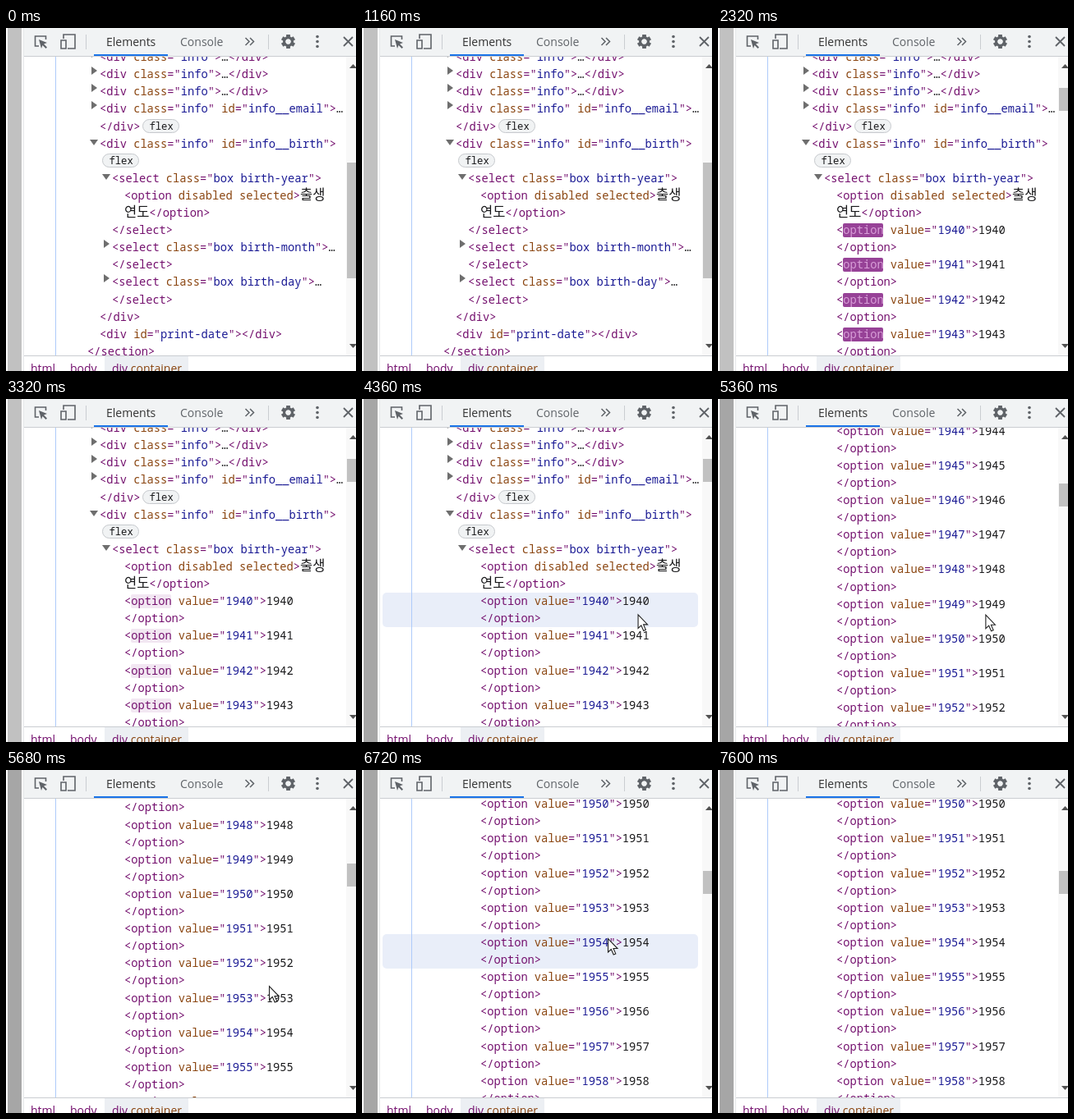
An HTML page with a canvas for the animation above (8560 ms loop, 426 by 418 pixels).

```html
<!DOCTYPE html>
<html lang="en">
<head>
<meta charset="utf-8">
<title>Elements panel</title>
<style>
  html, body { margin: 0; width: 100%; height: 100%; overflow: hidden; background: #fff; }
  canvas { display: block; }
</style>
</head>
<body>
<canvas id="stage" width="426" height="418"></canvas>
<script>
const ctx = document.getElementById('stage').getContext('2d');
const LOOP = 8560, ROW = 21.1, FIRST = 56.8, OPTION_ROW = 9;
const INSERT = 2160, PAGE_DIM = 4040;
const MONO = '13.73px "Noto Sans Mono", monospace';
const HANGUL = '300 16.5px "Noto Sans CJK KR", "Noto Sans CJK", sans-serif';
const UI = '14px "Open Sans", sans-serif';
const TAG = '#74106e', ATTR = '#8a4510', VALUE = '#1a1a94', TEXT = '#18181a';

// Each row: indent, markup, then an arrow or a badge.
const head = [
  [114, '<div class="info">…</div>', 'closed'],
  [114, '<div class="info">…</div>', 'closed'],
  [114, '<div class="info">…</div>', 'closed'],
  [114, '<div class="info" id="info__email">…', 'closed'],
  [114, '</div>', 'badge'],
  [114, '<div class="info" id="info__birth">', 'open'],
  [114, '', 'badge'],
  [129, '<select class="box birth-year">', 'open'],
  [144, '<option disabled selected>출생'],
  [144, '연도</option>']
];
const tail = [
  [129, '</select>'],
  [129, '<select class="box birth-month">…', 'closed'],
  [129, '</select>'],
  [129, '<select class="box birth-day">…', 'closed'],
  [129, '</select>'],
  [114, '</div>'],
  [114, '<div id="print-date"></div>'],
  [99, '</section>']
];
const options = [];
for (let year = 1940; year <= 2021; year++)
  options.push([144, `<option value="${year}">${year}`, 'new'], [144, '</option>']);
const before = [...head, ...tail], after = [...head, ...options, ...tail];

const wheel = [4774, 4990, 5190, 5400, 5648];
const pointerPath = [
  [4000, 2, 320], [4380, 338, 262], [4800, 338, 262], [5680, 320, 263],
  [6300, 299, 205], [6760, 299, 205], [7060, 400, -22]
];

const clamp = u => Math.max(0, Math.min(1, u));
const smooth = u => (u = clamp(u), u * u * (3 - 2 * u));
const mix = (a, b, u) => `rgb(${a.map((v, i) => Math.round(v + (b[i] - v) * u))})`;
const scrollAt = t => wheel.reduce((sum, start) => sum + 125.4 * smooth((t - start) / 150), 0);

function rect(x, y, w, h, color) {
  ctx.fillStyle = color;
  ctx.fillRect(x, y, w, h);
}
function round(x, y, w, h, r, fill, stroke) {
  ctx.beginPath();
  ctx.roundRect(x, y, w, h, r);
  ctx.fillStyle = fill;
  ctx.fill();
  if (stroke) { ctx.lineWidth = 1; ctx.strokeStyle = stroke; ctx.stroke(); }
}
function poly(points, fill) {
  ctx.beginPath();
  for (let i = 0; i < points.length; i += 2) ctx.lineTo(points[i], points[i + 1]);
  ctx.closePath();
  ctx.fillStyle = fill;
  ctx.fill();
}
function line(path, color, width) {
  ctx.strokeStyle = color;
  ctx.lineWidth = width;
  ctx.stroke(new Path2D(path));
}
function write(text, x, y, color, font) {
  ctx.font = font;
  ctx.fillStyle = color;
  ctx.fillText(text, x, y);
  return x + ctx.measureText(text).width;
}

function markup(x, y, source, tagColor) {
  const put = (text, color, font = MONO) => { x = write(text, x, y, color, font); };
  for (const [, tag, attr, value, text] of
       source.matchAll(/(<\/?\w+|>)|( [\w-]+)(?:="([^"]*)")?|([^<>]+)/g)) {
    if (tag) {
      const [mark] = tag.match(/^(<\/?|>)/);
      put(mark, TAG);
      put(tag.slice(mark.length), tagColor);
    } else if (attr) {
      put(attr, ATTR);
      if (value) { put('="', TAG); put(value, VALUE); put('"', TAG); }
    } else {
      put(text, TEXT, /[가-힣]/.test(text) ? HANGUL : MONO);
    }
  }
  return x;
}

function flash(t) {
  const age = t - INSERT, pale = [241, 229, 241];
  if (age >= 1400) return { box: null, text: TAG };
  const u = smooth(age / 1120);
  return {
    box: age < 1120 ? mix([146, 56, 146], pale, u)
                    : mix(pale, [255, 255, 255], smooth((age - 1120) / 280)),
    text: mix([222, 166, 222], [116, 16, 110], u)
  };
}

function pointerAt(t) {
  const i = pointerPath.findIndex(p => p[0] > t);
  if (i < 1) return null;
  const [t0, x0, y0] = pointerPath[i - 1], [t1, x1, y1] = pointerPath[i];
  const u = smooth((t - t0) / (t1 - t0));
  return { x: x0 + (x1 - x0) * u, y: y0 + (y1 - y0) * u };
}

function drawHover(t, scroll, pointer) {
  const scrolling = t > 4870 && t < 5990;
  if (!pointer || scrolling || pointer.x < 22 || pointer.y < 35) return;
  const settled = t < 5000 ? 0 : scroll;
  let row = Math.floor((pointer.y + settled - FIRST + 10.5) / ROW);
  row -= (row - OPTION_ROW) % 2;
  round(25, Math.round(FIRST + row * ROW - 11 - scroll), 384, 42, 5, '#e9eef9');
}

function drawTree(t, scroll, pointer) {
  ctx.save();
  ctx.beginPath();
  ctx.rect(22, 35, 404, 364);
  ctx.clip();
  drawHover(t, scroll, pointer);
  rect(60, 35, 1, 364, '#aecbfa');
  const glow = flash(t);
  (t < INSERT ? before : after).forEach(([x, source, kind], i) => {
    const y = FIRST + (i - 1) * ROW - scroll;
    if (y < 15 || y > 420) return;
    const base = Math.round(y + 4.4), left = x - 7;
    if (kind === 'closed')
      poly([left - 3, base - 14, left + 4, base - 9, left - 3, base - 4], '#6e6e6e');
    if (kind === 'open')
      poly([left - 5, base - 10, left + 5, base - 10, left, base - 3], '#6e6e6e');
    if (kind === 'new' && glow.box)
      round(x + 8, base - 13, 49, 17, 2, glow.box);
    const end = markup(x, base, source, kind === 'new' ? glow.text : TAG);
    if (kind === 'badge') {
      const bx = Math.round(end + 4) - .5;
      round(bx, base - 13.5, 44, 16, 8, '#f1f3f4', '#c6c9cd');
      write('flex', bx + 8, base - 1, TEXT, '12.2px "Noto Sans Mono", monospace');
    }
  });
  ctx.restore();
}

function drawScrollbar(t, scroll) {
  rect(414, 35, 12, 364, '#f8f8f8');
  if (t < INSERT) rect(415, 164, 11, 141, '#c1c1c1');
  else rect(415, Math.round(72.6 + scroll * .08), 11, 28, '#c1c1c1');
  poly([418, 49, 422.5, 44, 427, 49], '#505050');
  poly([418, 385, 427, 385, 422.5, 390], '#505050');
}

function drawToolbar() {
  const icon = '#5f6368';
  rect(22, 0, 404, 34, '#f1f3f4');
  rect(22, 34, 404, 1, '#cacdd1');
  rect(97, 8, 1, 18, '#cacdd1');
  rect(319, 8, 1, 18, '#cacdd1');
  line('M40 22H35.5V10H48.5V14', icon, 1.6);
  poly([40, 14, 50, 18, 46, 19.5, 50, 23.5, 48.5, 25, 44.5, 21, 43, 25], icon);
  line('M70 13V8H84V25H75M67 15H73V25H67Z', icon, 1.6);
  write('Elements', 122, 22, '#333', UI);
  write('Console', 212, 22, icon, UI);
  rect(107, 32, 90, 2, '#1a73e8');
  line('M291.5 12L296 16.5L291.5 21M297 12L301.5 16.5L297 21', icon, 1.5);

  ctx.save();
  ctx.translate(343.5, 16.5);
  for (let i = 0; i < 6; i++) {
    ctx.rotate(Math.PI / 3);
    rect(-2.4, -8.5, 4.8, 5, icon);
  }
  ctx.beginPath();
  ctx.arc(0, 0, 4.8, 0, 7);
  ctx.strokeStyle = icon;
  ctx.lineWidth = 3.4;
  ctx.stroke();
  ctx.beginPath();
  ctx.arc(0, 0, 3.1, 0, 7);
  ctx.fillStyle = '#f1f3f4';
  ctx.fill();
  ctx.restore();

  for (const y of [10.5, 16.5, 22.5]) round(377.2, y - 1.8, 3.6, 3.6, 1.8, icon);
  line('M411 11L422 22M422 11L411 22', icon, 1.8);
}

function drawBreadcrumbs() {
  rect(22, 399, 404, 1, '#cacdd1');
  rect(120, 400, 102, 18, '#eceff3');
  write('html', 30, 420, TAG, UI);
  write('body', 78, 420, TAG, UI);
  write('.container', write('div', 129, 420, TAG, UI), 420, ATTR, UI);
}

function drawPointer({ x, y }) {
  ctx.save();
  ctx.translate(x, y);
  const arrow = new Path2D('M.5 .5V17L4.3 13.5L7.2 20L9.8 18.9L7 12.5H12Z');
  ctx.fillStyle = '#fff';
  ctx.fill(arrow);
  ctx.strokeStyle = '#222';
  ctx.lineWidth = 1.1;
  ctx.stroke(arrow);
  ctx.restore();
}

function draw() {
  const t = performance.now() % LOOP;
  const scroll = scrollAt(t), pointer = pointerAt(t);
  rect(0, 0, 426, 418, '#fff');
  rect(2, 0, 17, 418, t < PAGE_DIM ? '#c1c1c1' : '#a6a6a6');
  rect(21, 0, 1, 418, '#e6e8ea');
  drawTree(t, scroll, pointer);
  drawScrollbar(t, scroll);
  drawToolbar();
  drawBreadcrumbs();
  if (pointer) drawPointer(pointer);
  requestAnimationFrame(draw);
}
draw();
</script>
</body>
</html>
```
